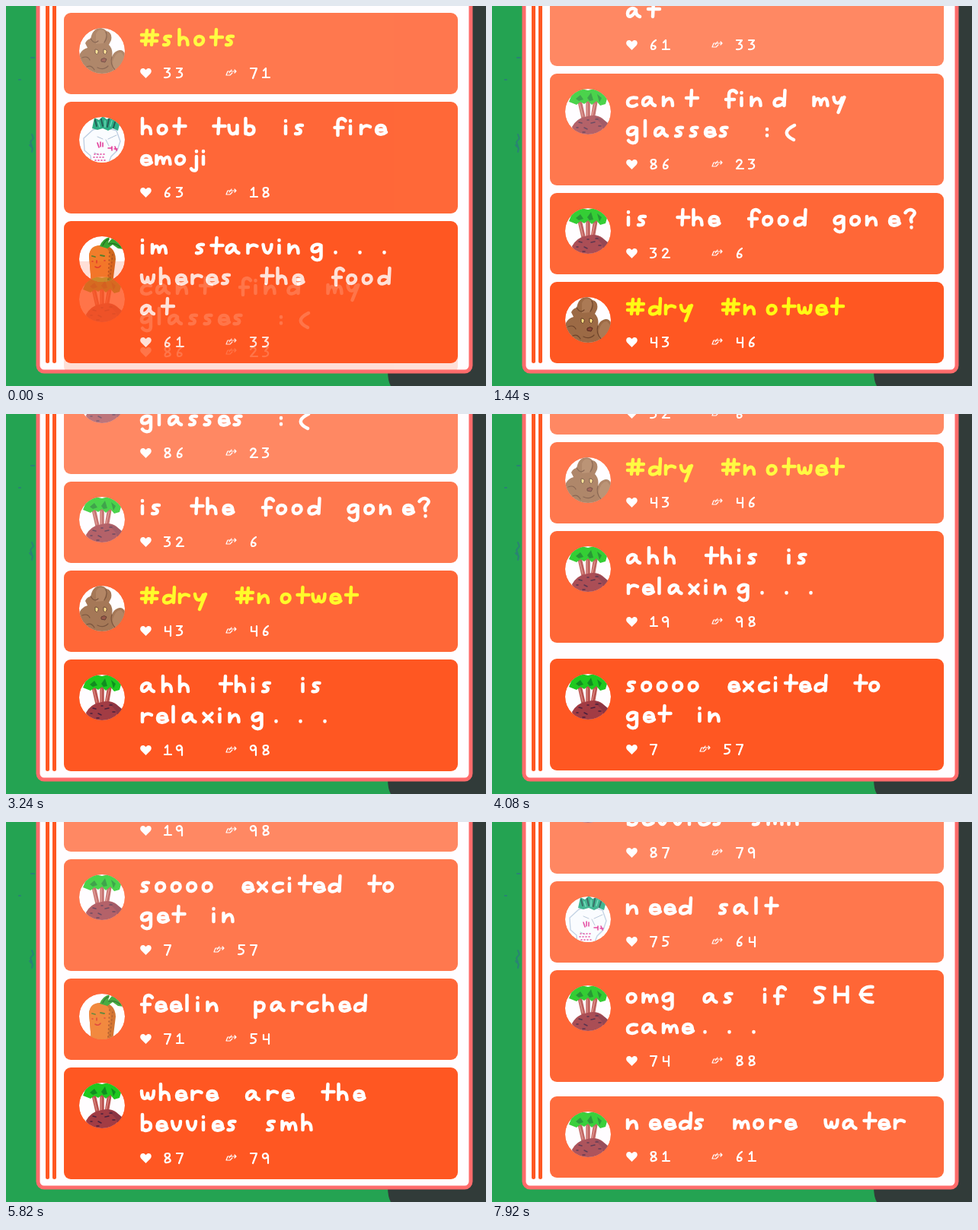
Recreate the animation shown at these times as an HTML page. Size 630 by 500 pixels, loop 7980 ms.

```html
<!DOCTYPE html>
<html lang="en">
<head>
<meta charset="utf-8">
<title>Veggie feed</title>
<style>
html, body { margin: 0; width: 100%; height: 100%; overflow: hidden; background: #24a352; }
svg { display: block; width: 100vw; height: 100vh; }
text { font-family: "DejaVu Sans Mono", monospace; fill: transparent; }
.ink { fill: none; stroke-linecap: round; stroke-linejoin: round; }
</style>
</head>
<body>
<svg id="stage" viewBox="0 0 630 500">
  <defs>
    <clipPath id="feedClip"><rect x="70" y="0" width="530" height="479"/></clipPath>
    <clipPath id="round"><circle r="30"/></clipPath>

    <g id="potato">
      <path fill="#9c6a45" d="M-22 32Q-32 16-29 4-26-2-19-4L-22-10Q-20-15-15-16-13-26-7-29 0-32 6-26 14-24 12-14L9-8Q15-2 13 8 15 2 20 0 28-4 32 8L30 24 20 34Z"/>
      <path fill="#ab7a55" d="M-8-22Q-5-30 2-27L6-22 2-10-8-9ZM14 14Q18 1 25 2L30 8 26 24 15 28Z"/>
      <path class="ink" stroke="#6d442b" stroke-width="1.2" d="M-15-16Q-10-8-5-13M5-25Q8-18 3-11M-26 9Q-19 6-16 12M13 8Q10 17 17 25M-20 21Q-14 18-10 25M-6 22Q2 26 8 20"/>
      <path fill="#ffdf80" stroke="#5f3a26" d="M-9-2q5 0 4 4t-4 1zM2-2q5 0 4 4t-4 1z"/>
      <path fill="#8d4635" stroke="#552b20" d="M-1 11q4-3 7 0l-2 4-5-1z"/>
    </g>

    <g id="radish">
      <path fill="#fafcff" stroke="#b8cbe0" stroke-width="1.4" d="M-24-2L-12-13 2-17 19-12 24 2 20 14 12 22 8 32H-14L-15 21-23 14Z"/>
      <path fill="#16a578" d="M-13-15L-10-29-4-26 1-31 6-27 14-30 17-25 24-24 21-12 14-15 8-12 1-15-6-13Z"/>
      <path class="ink" stroke="#0b4b42" stroke-width="2" d="M-9-26l2 8M-1-27l2 9M9-27l-2 10M17-23l-2 7"/>
      <path class="ink" stroke="#58d5ae" stroke-width="1.5" d="M-5-23l2 6M4-25v8M13-25l-2 7"/>
      <path class="ink" stroke="#a8bcd2" d="M-6-4l7 3M8-1l11-5M5 0l4 8M-10 17l6 3"/>
      <path class="ink" stroke="#df278f" stroke-width="1.6" d="M-6 4l2 6M-2 3v6M1 4v5M8 11h4M13 9v5M17 9l2 5M16 12h4"/>
      <path class="ink" stroke="#df278f" stroke-width="1.5" stroke-dasharray="1 3" d="M-10 19H3M-11 23H5M-9 27H6"/>
    </g>

    <g id="carrot">
      <path fill="#d0681f" d="M-17-4Q-16-18 0-18 17-18 18 0L14 32H-14Z"/>
      <path fill="#f17d2b" d="M-17-4Q-16-18-3-18 11-17 11 0L7 32H-14Z"/>
      <path fill="#36a42e" d="M-3-17Q1-27 10-29L8-21 13-27 24-22 29-13 21-14 14-19 7-14Z"/>
      <path class="ink" stroke="#257124" stroke-width="1.5" d="M1-18Q4-25 9-26M9-20Q17-22 24-16"/>
      <path class="ink" stroke="#a94f1e" stroke-dasharray="1 4" stroke-width="1.6" d="M14-6L10 30M10-9L8 27"/>
      <path class="ink" stroke="#557e2b" stroke-width="1.8" d="M-13-4l4 1M-2-5l5 1"/>
      <path class="ink" stroke="#de392b" stroke-width="1.6" d="M-7 2v3M-9 10q4 3 7-1M-13 3h1M3 2h1"/>
    </g>

    <g id="beet">
      <path class="ink" stroke="#b9534f" stroke-width="5.5" d="M-11-14L-6 8M0-16V8M10-14L6 9"/>
      <path class="ink" stroke="#dc8780" stroke-width="1.3" d="M-11-10L-7 6M-1-11V6M9-10L5 7"/>
      <path fill="#1fc920" d="M-25-13L-21-23-9-30 0-28 8-30 18-26 25-17 23-10 16-8 11-14 5-9 0-14-5-10-10-13-15-9Z"/>
      <path fill="#118d20" d="M-16-17l6-5 4 6-6 2zM-1-18l5-7 3 10-5 1zM12-23l6 5-3 6z"/>
      <path fill="#a23c44" d="M-21 20Q-15 9-4 7 10 2 19 9L30 19 26 34H-18Z"/>
      <path fill="#8b3543" d="M8 6Q20 8 30 19L24 32 18 17Z"/>
      <path class="ink" stroke="#48203d" stroke-width="1.5" d="M-12 14l4 1M4 15l5-1M-5 21l4 2M-15 21h2M14 19h3M-1 11h2M10 10h3M-7 27h3"/>
    </g>
  </defs>

  <rect width="630" height="500" fill="#24a352"/>
  <path fill="#313b39" d="M609 0H630V500H505Q501 493 501 480L609 476Z"/>
  <path class="ink" stroke="#2a8275" stroke-width="2" d="M34 169L36 174 32 179 34 184M31 183L35 187 34 192M33 68h4M17 97h2"/>
  <rect x="42" y="-20" width="568" height="501" rx="8" fill="#fffdff" stroke="#ff6b6b" stroke-width="5"/>
  <rect x="52" y="-9" width="5" height="479" rx="2.5" fill="#ff5722"/>
  <rect x="61" y="-9" width="5" height="479" rx="2.5" fill="#ff5722"/>
  <g id="feed" clip-path="url(#feedClip)"></g>
</svg>
<script>
const LOOP = 7980, TICK = 60, BOTTOM = 469.6, GAP = 10, LINE = 40;

// Pen strokes for the hand lettering; the baseline is y = 0.
const stem = 'M3-21V-1';
const loops = {
  a: 'M13-10C9-14 2-11 2-5 2 1 9 0 13-10Q12-3 18-1',
  b: stem + 'M3-8C6-13 14-12 14-6S6 2 3-3',
  c: 'M14-11C6-13 2-9 2-5 2 1 10 1 14-2',
  d: 'M13-9C7-12 2-9 2-4S10 1 15-6M16-21L15-1',
  e: 'M3-6H14C14-14 2-14 2-6 2 1 10 1 15-3',
  g: 'M14-11C8-14 2-11 2-6S11-1 14-10V3C14 10 6 9 3 5',
  o: 'M7-12C0-12 0 0 7-1S15-12 7-12',
  p: 'M3-12V8M3-8C5-13 15-13 14-6S6 1 3-3',
  s: 'M11-12C3-13 1-9 6-7S9 0 2-1'
};
const stems = {
  f: 'M16-18C12-23 6-21 6-15V1M2-9H13',
  h: stem + 'M3-6C6-12 14-13 14-1',
  i: 'M3-11V-1M3-18v.5',
  j: 'M8-11V4C8 9 3 8 1 5M8-18v.5',
  l: stem,
  m: 'M2-12V-1C3-10 10-15 11-2 12-12 20-14 20-1',
  n: 'M2-12V-1C4-10 14-16 14-1',
  r: 'M3-12V-1M3-6C5-11 10-13 15-10',
  t: 'M9-21L8-1M2-11H17',
  u: 'M2-12C2 2 9 1 13-5V-12V-1',
  v: 'M2-12C3-3 6-1 8-1S13-6 13-12',
  w: 'M2-12C2 1 9 0 10-9 10 1 18 1 18-12',
  x: 'M2-12L13-1M13-12L2-1',
  y: 'M2-12C3-2 10-2 13-11M16-12L8 8'
};
const marks = {
  S: 'M16-19C2-23 1-15 9-12S15 1 3-1',
  H: stem + 'M19-21V-1M3-11H19',
  E: 'M22-21C2-23 2 0 22-1M6-11H20',
  '#': 'M9-20L7-1M17-20L15-1M2-14H23M2-6H22',
  '.': 'M11-2v.5',
  ':': 'M12-10v.5M12-2v.5',
  '(': 'M16-15C2-8 3-2 15 4',
  '?': 'M3-17C8-25 20-19 13-13Q9-9 11-5M11 2v.5'
};
const digits = {
  1: 'M2-10L5-13V-1M1-1H10',
  2: 'M1-10C3-15 10-12 7-8L1-1H10',
  3: 'M1-13H8L4-8C10-8 10 0 1-1',
  4: 'M2-12V-6H9M9-13V0',
  5: 'M9-13H2V-8C10-9 10 0 1-1',
  6: 'M8-13C2-10 0-1 4-1S10-6 3-6',
  7: 'M1-13H9L4 0',
  8: 'M5-7C0-9 1-13 5-13S9-9 5-7 0 0 5-1 10-5 5-7',
  9: 'M8-9C7-15 0-13 1-9S7-6 8-10V0'
};
const pen = { ...loops, ...stems, ...marks, ...digits };

const advance = {};
[[14, 'ijl'], [19.5, 'esf'], [20, 'tcdxv'], [20.5, 'ob'], [21, 'ru'], [22, 'hgp'],
 [23, 'y?'], [24, 'w'], [26, 'm'], [27, 'aSE'], [29, '#'], [30, 'nH'], [32, ' .:(']]
  .forEach(([w, set]) => [...set].forEach(ch => advance[ch] = w));

// Arrival time, face, likes, shares, lines of text
const posts = [
  [-9000, 'potato', 33, 71, '#shots'],
  [-8000, 'radish', 63, 18, 'hot tub is fire', 'emoji'],
  [-7000, 'carrot', 61, 33, 'im starving...', 'wheres the food', 'at'],
  [-1, 'beet', 86, 23, 'cant find my', 'glasses :('],
  [575, 'beet', 32, 6, 'is the food gone?'],
  [1125, 'potato', 43, 46, '#dry #notwet'],
  [2030, 'beet', 19, 98, 'ahh this is', 'relaxing...'],
  [3940, 'beet', 7, 57, 'soooo excited to', 'get in'],
  [4255, 'carrot', 71, 54, 'feelin parched'],
  [5540, 'beet', 87, 79, 'where are the', 'bevvies smh'],
  [6345, 'radish', 75, 64, 'need salt'],
  [6345, 'beet', 74, 88, 'omg as if SHE', 'came...'],
  [7815, 'beet', 81, 61, 'needs more water']
];

function add(parent, tag, attrs) {
  const el = document.createElementNS('http://www.w3.org/2000/svg', tag);
  for (const k in attrs) el.setAttribute(k, attrs[k]);
  return parent.appendChild(el);
}

// Letters are pen strokes over a selectable text line.
function write(parent, str, x, y, color, width, step) {
  add(parent, 'text', { x, y, 'font-size': step ? 14 : 24 }).textContent = str;
  for (const ch of str) {
    if (pen[ch]) add(parent, 'path', {
      class: 'ink', d: pen[ch], stroke: color, 'stroke-width': width,
      transform: `translate(${x} ${y})`
    });
    x += step || advance[ch];
  }
}

function makeCard([start, face, likes, shares, ...lines]) {
  const h = 67 + LINE * lines.length, foot = h - 28;
  const g = add(document.getElementById('feed'), 'g', {});
  add(g, 'rect', { x: 76, width: 517, height: h, rx: 9, fill: '#ff5722' });
  const badge = add(g, 'g', { transform: 'translate(126 50)', 'clip-path': 'url(#round)' });
  add(badge, 'circle', { r: 30, fill: '#fffdff' });
  add(badge, 'use', { href: '#' + face });

  lines.forEach((s, i) =>
    write(g, s, 176, 43 + LINE * i, s[0] === '#' ? '#fffa14' : '#fff', 4.5));

  add(g, 'path', {
    fill: '#fff', transform: `translate(183.5 ${foot})`,
    d: 'M0 7L-6 1C-10-4-4-9 0-4 4-9 10-4 6 1Z'
  });
  const shareX = 256 + 16 * String(likes).length;
  add(g, 'path', {
    class: 'ink', stroke: '#fff', 'stroke-width': 1.2,
    transform: `translate(${shareX} ${foot - 6})`,
    d: 'M1 9L3 4H14M12 2L14 4 12 6M1 9H6L9 6M5 6L8 2'
  });
  write(g, String(likes), 207, foot + 7, '#fff', 2.2, 16);
  write(g, String(shares), shareX + 32, foot + 7, '#fff', 2.2, 16);
  return { g, start, h };
}

const cards = posts.map(makeCard);
const clamp = v => Math.max(0, Math.min(1, v));

// Underdamped spring from 1 to 0
function spring(t) {
  if (t <= 0) return 1;
  const a = .02, w = .0273;
  return Math.exp(-a * t) * (Math.cos(w * t) + a / w * Math.sin(w * t));
}

function draw(time) {
  const t = Math.floor(time / TICK) * TICK;
  let rise = 0, rank = 0;
  for (let i = cards.length - 1; i >= 0; i--) {
    const card = cards[i], age = t - card.start;
    const next = cards[i + 1];
    if (next && t >= next.start) {
      const together = next.start === card.start;
      rise += (next.h + GAP) * (together ? 1 : 1 - spring(t - next.start));
      rank += together ? 1 : clamp((t - next.start) / 110);
    }
    const y = BOTTOM - card.h - rise + 13.5 * spring(age);
    const shown = age >= 0 && y + card.h > 0;
    card.g.setAttribute('display', shown ? 'inline' : 'none');
    if (!shown) continue;
    card.g.setAttribute('transform', `translate(0 ${Math.round(y)})`);
    card.g.setAttribute('opacity', clamp(.17 + age / 150) * Math.max(.5, 1 - .1 * rank));
  }
}

const begin = performance.now();
function frame() {
  draw((performance.now() - begin) % LOOP);
  requestAnimationFrame(frame);
}
frame();
</script>
</body>
</html>
```
